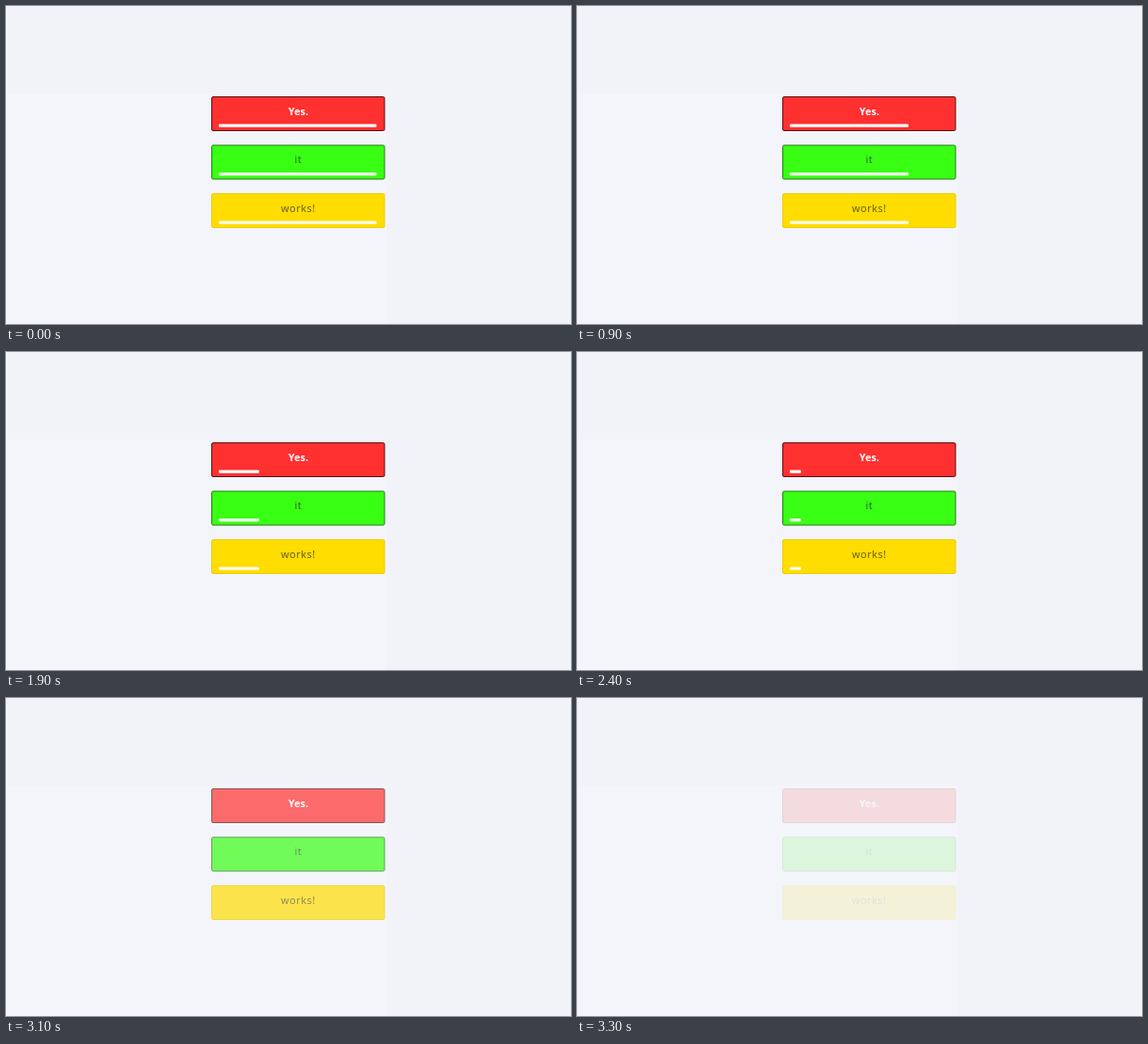
These frames come from a looping animation (600x338 px, 3400 ms). An HTML page:

```html
<!DOCTYPE html>
<html>
<head>
<meta charset="utf-8">
<style>
  html, body { margin: 0; width: 100%; height: 100%; overflow: hidden; background: #f2f3f8; }
  svg { display: block; width: 600px; height: 338px; }
  text { font: 11px "Open Sans", "Noto Sans", sans-serif; text-anchor: middle; }
</style>
</head>
<body>
<svg viewBox="0 0 600 338">
  <rect y="93" width="404" height="245" fill="#f3f5fa"/>
  <g id="notes"></g>
</svg>
<script>
const LOOP = 3400, STEP = 100;
const BAR_START = -110, BAR_TIME = 3030, BAR_WIDTH = 168;
const FADE_START = 2915, FADE_TIME = 500;

const notes = document.getElementById('notes');
const items = [
  { text: 'Yes.', fill: '#ff3030', edge: '#5c1010', ink: '#fff', weight: 700, spacing: 0, bar: 1 },
  { text: 'it', fill: '#39ff14', edge: '#267a18', ink: '#2b5c20', weight: 400, spacing: 0.5, bar: 0.93 },
  { text: 'works!', fill: '#ffdd00', edge: '#eccb00', ink: '#5c5318', weight: 400, spacing: 0.5, bar: 0.93 }
];

notes.innerHTML = items.map((n, i) => `
  <g transform="translate(218 ${96 + i * 51.5})">
    <rect x=".5" y=".5" width="183.5" height="36" rx="1.5" fill="${n.fill}" stroke="${n.edge}"/>
    <text x="92.4" y="19.6" fill="${n.ink}" font-weight="${n.weight}"
      style="font-weight:${n.weight};letter-spacing:${n.spacing}px">${n.text}</text>
    <rect class="bar" x="8" y="29.5" height="3.3" rx="1" fill="#fff" opacity="${n.bar}"/>
  </g>`).join('');
const bars = notes.querySelectorAll('.bar');

// Remaining share of a cosine-eased change from 1 to 0
function remaining(t, start, duration) {
  const p = Math.min(1, Math.max(0, (t - start) / duration));
  return 0.5 + Math.cos(p * Math.PI) / 2;
}

const began = performance.now();
function draw() {
  const elapsed = Math.max(0, performance.now() - began) % LOOP;
  const t = Math.floor(elapsed / STEP) * STEP;
  const width = BAR_WIDTH * remaining(t, BAR_START, BAR_TIME);
  bars.forEach(bar => bar.setAttribute('width', width));
  notes.setAttribute('opacity', remaining(t, FADE_START, FADE_TIME));
  requestAnimationFrame(draw);
}
draw();
</script>
</body>
</html>
```
